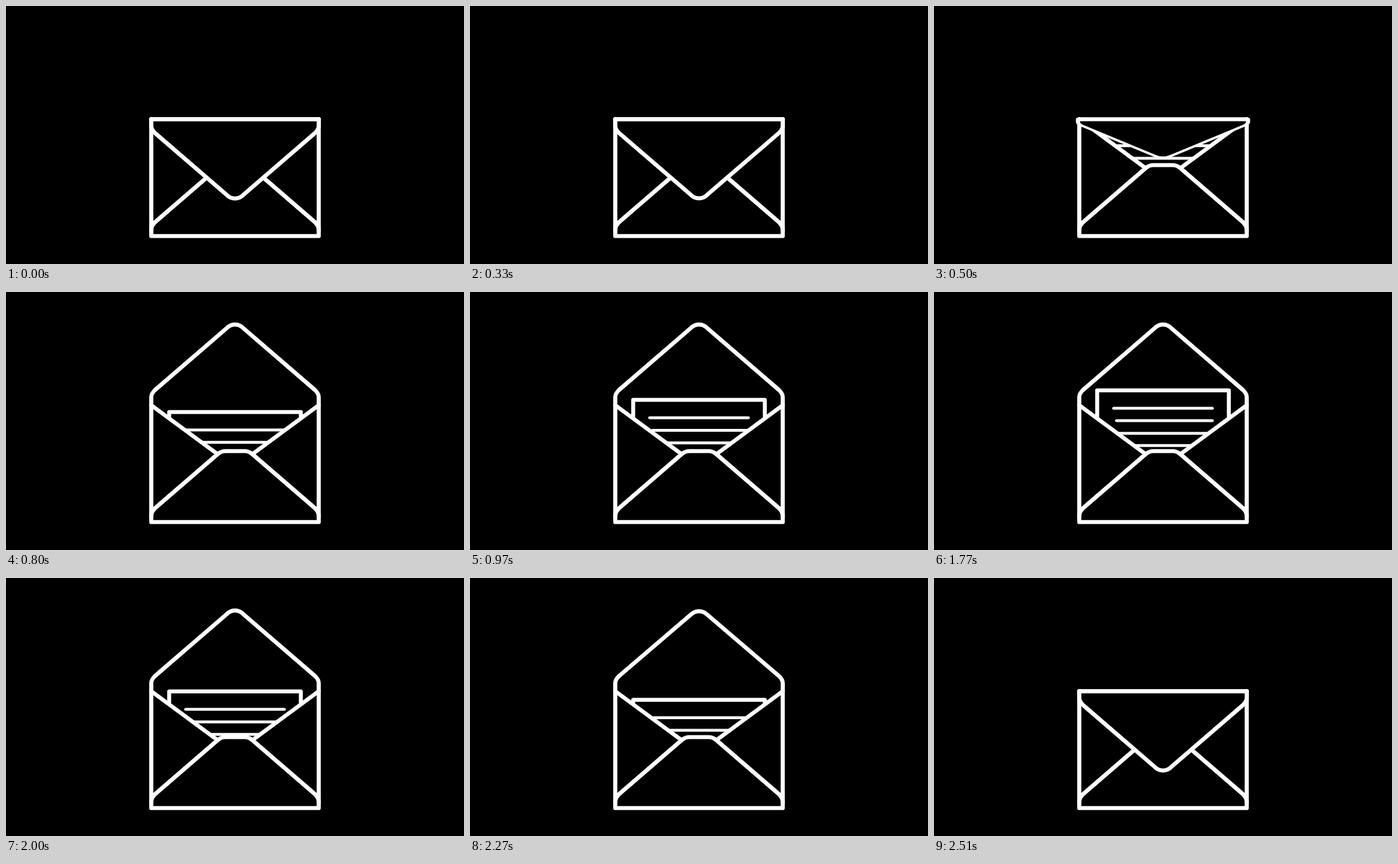
Recreate the animation shown at these times as an HTML page with a canvas. Size 640 by 360 pixels, loop 6520 ms.

```html
<!DOCTYPE html>
<html lang="en">
<head>
<meta charset="utf-8">
<title>Envelope</title>
<style>
html, body { margin: 0; width: 100%; height: 100%; overflow: hidden; background: #000; }
canvas { display: block; width: 640px; height: 360px; }
</style>
</head>
<body>
<canvas id="stage" width="640" height="360"></canvas>
<script>
const ctx = document.getElementById('stage').getContext('2d');
const LOOP = 6520;
const LEFT = 203, RIGHT = 437, TOP = 158, BOTTOM = 321, HINGE = 157;
const LETTER_LOW = 170, LETTER_HIGH = 132;
const STROKE = 5.7;

const clamp = x => Math.min(1, Math.max(0, x));
const progress = (t, from, to) => clamp((t - from) / (to - from));
const smooth = x => x * x * (3 - 2 * x);
const cubicInOut = x => x < 0.5 ? 4 * x ** 3 : 1 - 4 * (1 - x) ** 3;
const backIn = x => x * x * (1.9 * x - 0.9);

// The motion steps at 12.5 fps on a 30 fps clock.
function stepTime(t) {
  const tick = Math.floor((t + 4) * 0.03);
  return Math.ceil(Math.floor(tick * 5 / 12) * 12 / 5) / 0.03;
}

// 1 = closed, -1 = open
function flapScale(t) {
  if (t < 1500) return 1 - 2 * cubicInOut(progress(t, 300, 800));
  return -1 + 2 * backIn(progress(t, 2050, 2499));
}

function letterTop(t) {
  const up = smooth(progress(t, 725, 1200));
  const down = progress(t, 1710, 2130);
  return LETTER_LOW + (LETTER_HIGH - LETTER_LOW) * (up - down);
}

function line(width, ...points) {
  ctx.lineWidth = width;
  ctx.beginPath();
  points.forEach(([x, y]) => ctx.lineTo(x, y));
  ctx.stroke();
}

function drawFlap(scale) {
  const widen = 1 + 0.02 * Math.max(0, 1 - scale * scale);
  ctx.save();
  ctx.translate(320, HINGE);
  ctx.scale(widen, Math.abs(scale) < 0.01 ? 0.01 : scale);
  ctx.translate(-320, 0);
  ctx.beginPath();
  ctx.moveTo(LEFT, 1);
  ctx.lineTo(LEFT, 10);
  ctx.quadraticCurveTo(LEFT, 15.5, 208.5, 20.5);
  ctx.lineTo(308.5, 106.7);
  ctx.bezierCurveTo(315, 113.2, 325, 113.2, 331.5, 106.7);
  ctx.lineTo(431.5, 20.5);
  ctx.quadraticCurveTo(RIGHT, 15.5, RIGHT, 10);
  ctx.lineTo(RIGHT, 1);
  if (scale > 0) ctx.closePath();
  ctx.fill();
  ctx.lineWidth = STROKE;
  ctx.stroke();
  ctx.restore();
}

function drawLetter(y) {
  ctx.fillRect(228, y, 184, 150);
  line(5.5, [228, 260], [228, y], [412, y], [412, 260]);
  [25, 42.4, 60, 77].forEach((dy, i) =>
    line(4, [i === 1 ? 255 : 251, y + dy], [389, y + dy]));
}

function drawPocket() {
  ctx.beginPath();
  [[LEFT, TOP], [294, 225], [304, 222], [336, 222], [346, 225],
   [RIGHT, TOP], [RIGHT, BOTTOM], [LEFT, BOTTOM]].forEach(([x, y]) => ctx.lineTo(x, y));
  ctx.fill();

  line(5.5, [LEFT, TOP], [294, 225]);
  line(5.5, [RIGHT, TOP], [346, 225]);

  ctx.lineWidth = STROKE;
  ctx.beginPath();
  ctx.moveTo(LEFT, 313);
  ctx.quadraticCurveTo(LEFT, 306, 209, 301);
  ctx.lineTo(296, 226);
  ctx.quadraticCurveTo(301, 222, 306, 222);
  ctx.lineTo(334, 222);
  ctx.quadraticCurveTo(339, 222, 344, 226);
  ctx.lineTo(431, 301);
  ctx.quadraticCurveTo(RIGHT, 306, RIGHT, 313);
  ctx.stroke();

  line(STROKE, [LEFT, TOP], [LEFT, BOTTOM], [RIGHT, BOTTOM], [RIGHT, TOP]);
}

function draw(t) {
  const scale = flapScale(t);
  ctx.fillStyle = '#000';
  ctx.fillRect(0, 0, 640, 360);
  ctx.strokeStyle = '#fff';
  ctx.lineCap = ctx.lineJoin = 'round';

  if (scale <= 0) drawFlap(scale);
  drawLetter(letterTop(t));
  drawPocket();
  if (scale > 0) {
    drawFlap(scale);
    line(STROKE, [LEFT, TOP], [RIGHT, TOP]);
  }
}

const start = performance.now();
function tick() {
  draw(stepTime((performance.now() - start) % LOOP));
  requestAnimationFrame(tick);
}
tick();
</script>
</body>
</html>
```
